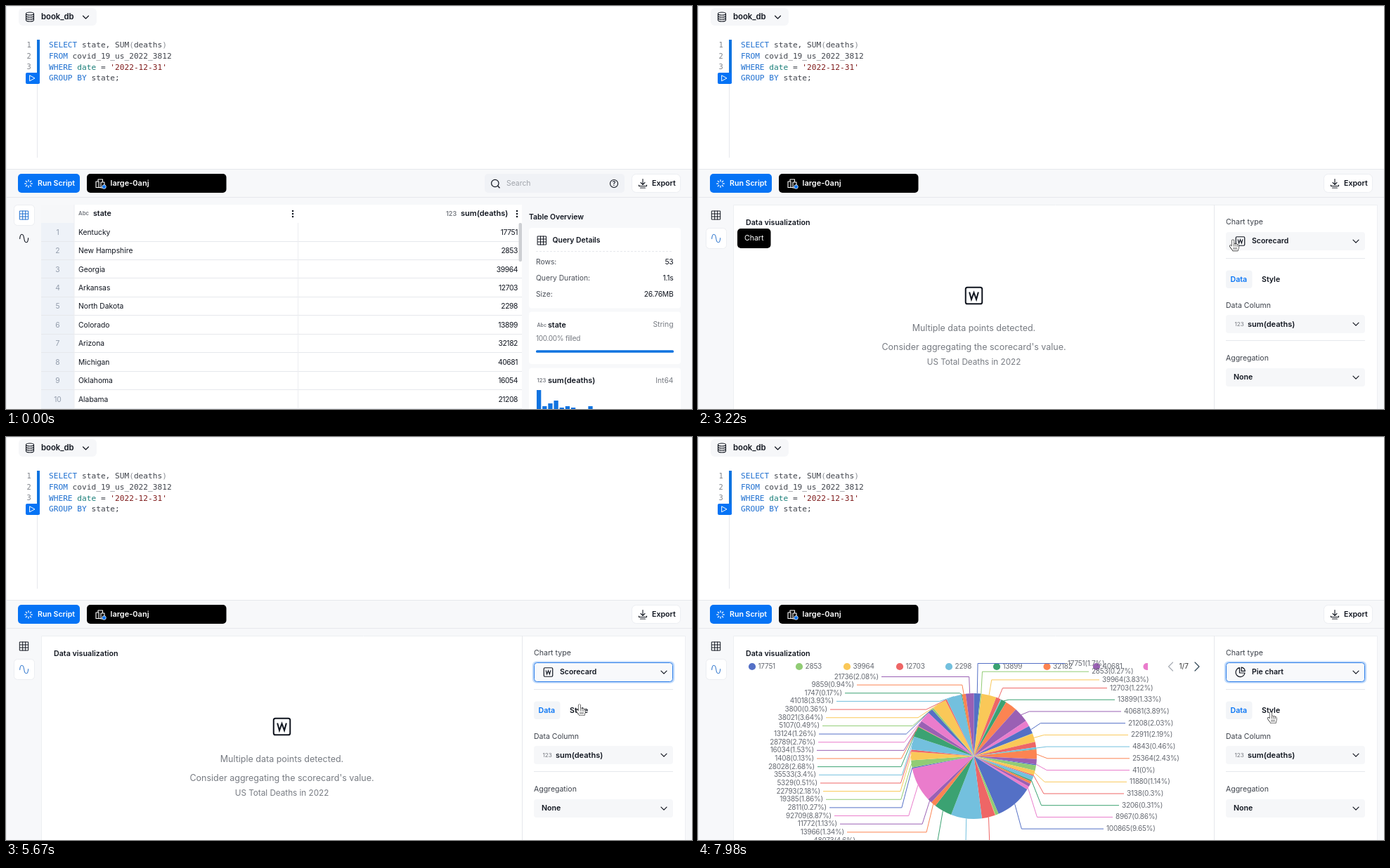
Animation of 976 by 574 pixels, one loop 8 s. Source, as an HTML page with a canvas:

```html
<!DOCTYPE html>
<html lang="en">
<head>
<meta charset="utf-8">
<title>Query chart</title>
<style>
html, body { margin: 0; width: 100%; height: 100%; overflow: hidden; background: #fff; }
canvas { display: block; width: 976px; height: 574px; }
</style>
</head>
<body>
<canvas id="stage"></canvas>
<script>
const W = 976, H = 574, LOOP = 8000, STEP = 70;
const INK = '#10151f', GRAY = '#777b82', BLUE = '#0573f5', LINE = '#e6e8ec', PALE = '#f6f7f9';
const PALETTE = ['#5470c6', '#91cc75', '#fac858', '#ee6666', '#73c0de', '#3ba272', '#fc8452', '#9a60b4', '#ea7ccc'];
const canvas = document.getElementById('stage');
const c = canvas.getContext('2d');
const dpr = window.devicePixelRatio || 1;
canvas.width = W * dpr;
canvas.height = H * dpr;

// helpers
const ramp = (t, a, b) => Math.min(1, Math.max(0, (t - a) / (b - a)));
const smooth = p => p * p * (3 - 2 * p);
const cubic = p => p < 0.5 ? 4 * p ** 3 : 1 - 4 * (1 - p) ** 3;

function text(s, x, y, size = 10.4, weight = 400, color = INK, align = 'left', spacing = 0) {
  c.font = `${weight} ${size}px Inter, Roboto, sans-serif`;
  c.letterSpacing = spacing + 'px';
  c.textAlign = align;
  c.fillStyle = color;
  c.fillText(s, x, y);
}
const bold = (s, x, y, size = 10.6, color = INK, align) => text(s, x, y, size, 600, color, align);

function box(x, y, w, h, r, fill, stroke, lw = 1) {
  c.beginPath();
  c.roundRect(x, y, w, h, r);
  if (fill) { c.fillStyle = fill; c.fill(); }
  if (stroke) { c.strokeStyle = stroke; c.lineWidth = lw; c.stroke(); }
}
function line(points, color = LINE, lw = 1) {
  c.beginPath();
  points.forEach(([x, y], i) => i ? c.lineTo(x, y) : c.moveTo(x, y));
  c.strokeStyle = color;
  c.lineWidth = lw;
  c.stroke();
}
function dot(x, y, r, fill, stroke, lw = 1.2) {
  c.beginPath();
  c.arc(x, y, r, 0, 7);
  if (fill) { c.fillStyle = fill; c.fill(); }
  if (stroke) { c.strokeStyle = stroke; c.lineWidth = lw; c.stroke(); }
}
function shape(d, x, y, stroke, lw = 1.2, fill) {
  c.save();
  c.translate(x, y);
  const p = new Path2D(d);
  c.lineJoin = c.lineCap = 'round';
  if (stroke) { c.strokeStyle = stroke; c.lineWidth = lw; c.stroke(p); }
  if (fill) { c.fillStyle = fill; c.fill(p); }
  c.restore();
}
function faded(alpha, draw) {
  if (alpha <= 0) return;
  c.save();
  c.globalAlpha = alpha;
  draw();
  c.restore();
}

// icons
const chevron = (x, y) => shape('M-4 -2L0 2L4 -2', x, y, INK, 1.15);
const gridIcon = (x, y, color) =>
  shape('M-6 -6H6V6H-6ZM-6 -2H6M-6 2H6M-2 -6V6M2 -6V6', x, y, color, 1);
const waveIcon = (x, y, color) =>
  shape('M-6 .5C-5.5 -8 -1 -7.5 0 0S5.5 8 6 -.5', x, y, color, 1.1);
const kebab = (x, y) => [-4, 0, 4].forEach(d => dot(x, y + d, 1.25, INK));

function wIcon(x, y, size, color, lw) {
  box(x - size / 2, y - size / 2, size, size, size / 9, null, color, lw);
  const k = size / 24;
  line([[-6.5, -5], [-3.6, 5.5], [0, -4.5], [3.6, 5.5], [6.5, -5]].map(([a, b]) => [x + a * k, y + b * k]), color, lw);
}
const typeIcons = [
  (x, y, col) => wIcon(x, y, 12.5, col, 1.2),
  (x, y, col) => shape('M-1 -6.3A6.5 6.5 0 1 0 6.5 1H-1ZM1.6 -6.8V-1.6H6.8A6 6 0 0 0 1.6 -6.8Z', x, y, col, 1.2),
  (x, y, col) => shape('M-6 2h3v4h-3ZM-1.6 -1h3v7h-3ZM3 -6h3v12h-3Z', x, y, col, 0.6, col),
  (x, y, col) => shape('M-6.5 -6.5V6.5H7M-5 4L-2 -1L1 1.5L6.5 -5.5', x, y, col, 1.2)
];
const TYPES = ['Scorecard', 'Pie chart', 'Bar chart', 'Line chart'];

// editor and toolbar
const CODE = [
  [['SELECT', '#1e6fd0'], [' state, ', '#40444c'], ['SUM', '#40444c'], ['(', '#8b8f96'], ['deaths', '#40444c'], [')', '#8b8f96']],
  [['FROM', '#1e6fd0'], [' covid_19_us_2022_3812', '#40444c']],
  [['WHERE', '#1e6fd0'], [' date', '#1b7f79'], [' = ', '#40444c'], ["'2022-12-31'", '#7f1a1a']],
  [['GROUP BY', '#1e6fd0'], [' state;', '#40444c']]
];
function editor() {
  c.fillStyle = '#fff';
  c.fillRect(0, 0, W, 232);
  box(18, 3, 111, 25, 6, PALE);
  shape('M-5.5 -4.5A5.5 2 0 0 1 5.5 -4.5A5.5 2 0 0 1 -5.5 -4.5V4.5A5.5 2 0 0 0 5.5 4.5V-4.5M-5.5 -1.5A5.5 2 0 0 0 5.5 -1.5M-5.5 1.5A5.5 2 0 0 0 5.5 1.5', 34, 15.5, INK, 1.1);
  bold('book_db', 50, 15.5, 11.3);
  chevron(113.5, 16);
  line([[44.5, 48], [44.5, 216]]);
  c.fillStyle = '#0f73e0';
  c.fillRect(44, 48, 4, 62);
  box(28, 95, 20, 16, 2, BLUE);
  shape('M-3 -3.8L4 0L-3 3.8Z', 37, 102.8, '#fff', 1);
  c.letterSpacing = '0px';
  CODE.forEach((parts, i) => {
    const y = 56.2 + i * 15.75;
    c.textAlign = 'left';
    c.font = '10.4px "DejaVu Sans Mono", monospace';
    c.fillStyle = '#80848b';
    if (i < 3) c.fillText(i + 1, 29.5, y);
    c.font = '11.16px "DejaVu Sans Mono", monospace';
    let x = 61;
    for (const [s, color] of parts) {
      c.fillStyle = color;
      c.fillText(s, x, y);
      x += c.measureText(s).width;
    }
  });
}
function toolbar(search) {
  line([[0, 232.5], [W, 232.5]]);
  line([[0, 272.5], [W, 272.5]]);
  box(17, 239, 88, 27, 5, BLUE);
  for (let i = 0; i < 8; i++) {
    const a = i * Math.PI / 4, s = Math.sin(a), k = Math.cos(a);
    line([[32 + s * 2.8, 253 + k * 2.8], [32 + s * 5.8, 253 + k * 5.8]], '#fff', 1.2);
  }
  bold('Run Script', 45, 253, 10.6, '#fff');
  box(115, 239, 198.5, 27, 5, '#000');
  shape('M-6 5.5V-3H-3V-6H3.5V-2M-6 5.5H1M-2 5V-3M1 -2H6V6H1Z', 134, 253, '#fff', 1.1);
  dot(139.5, 257.5, 2.8, BLUE, '#fff', 0.8);
  bold('large-0anj', 148.5, 253, 11, '#fff');
  if (search) {
    box(681, 239, 199, 27, 5, '#f0f2f6');
    dot(695.8, 252.5, 5.2, null, INK);
    line([[699.6, 256.3], [702.5, 259.2]], INK, 1.3);
    text('Search', 712, 253, 10.4, 400, '#a0a4ab');
    dot(865, 253, 5.5, null, INK, 1.1);
    bold('?', 865, 253.2, 8.5, INK, 'center');
  }
  box(890.5, 239.5, 69, 26, 6, '#fff', '#eceef2');
  shape('M0 -6V1.5M-3 -1.2L0 2L3 -1.2M-5.5 2.5V4H5.5V2.5M-3.5 6.5H3.5', 906, 252.5, INK, 1.1);
  bold('Export', 919, 253);
}
function sidebar(chart, hover) {
  box(11.5, chart ? 316.5 : 283.5, 29, 29, 5, '#fff', '#eceef2');
  if (!chart) faded(hover, () => box(11, 317, 30, 29, 5, '#eff1f5'));
  gridIcon(25.7, 298, chart ? INK : '#1e6fd0');
  waveIcon(25.7, 331, chart ? '#3d7fd0' : INK);
}

// table view
const ROWS = ['Kentucky', 'New Hampshire', 'Georgia', 'Arkansas', 'North Dakota', 'Colorado', 'Arizona', 'Michigan', 'Oklahoma', 'Alabama'];
const DEATHS = [
  17751, 2853, 39964, 12703, 2298, 13899, 32182, 40681, 16054, 21208, 1000, 22911, 14000, 4843, 1500, 25364, 14000, 41,
  3000, 14000, 11880, 3138, 12000, 3206, 7000, 8200, 8967, 100865, 9000, 800, 36000, 83000, 48073, 13966, 11772, 92709,
  2811, 19385, 22793, 5329, 35533, 28028, 1408, 16034, 28789, 13124, 5107, 38021, 3800, 41018, 1747, 9859, 21736
];
const TOTAL = 1044750;

function tableView() {
  c.fillStyle = '#fff';
  c.fillRect(50, 283, 684, 291);
  c.fillStyle = PALE;
  c.fillRect(50, 283, 47, 26);
  c.fillStyle = '#eef2f8';
  c.fillRect(50, 309, 47, 265);
  text('Abc', 103, 296, 7.8, 600, GRAY);
  bold('state', 124, 296, 10.7);
  kebab(408, 296);
  text('123', 626, 296, 9, 600, GRAY);
  bold('sum(deaths)', 647, 296, 11);
  kebab(727, 296);
  ROWS.forEach((name, i) => {
    const y = 322.5 + i * 26.45;
    line([[50, Math.round(y + 13) - 0.5], [734, Math.round(y + 13) - 0.5]]);
    text(i + 1, 73.5, y, 10.3, 400, '#929cab', 'center');
    text(name, 103, y, 10.3);
    text(DEATHS[i], 728, y, 10.3, 400, INK, 'right', -0.4);
  });
  line([[415.5, 309], [415.5, 574]], '#eceef1');
  line([[97, 283], [97, 574]], '#eceef1');
  box(729.5, 309, 4.5, 55, 2, '#cdcfd3');

  bold('Table Overview', 744, 301, 10.4);
  box(744, 316, 216, 114.5, 4, '#fff');
  gridIcon(762.5, 334, INK);
  bold('Query Details', 777.5, 334, 10.4);
  c.setLineDash([3, 2]);
  line([[754, 349.5], [949, 349.5]]);
  c.setLineDash([]);
  [['Rows:', '53'], ['Query Duration:', '1.1s'], ['Size:', '26.76MB']].forEach(([k, v], i) => {
    text(k, 754, 364.8 + i * 23.2, 10.3, 400, '#4a4f58');
    text(v, 949.5, 364.8 + i * 23.2, 10.3, 400, INK, 'right', -0.2);
  });
  box(744, 435.5, 216, 74.5, 4, '#fff');
  text('Abc', 755.5, 454.5, 7, 600, GRAY);
  bold('state', 771, 454.3, 10.7);
  text('String', 949.5, 454.3, 10.4, 400, GRAY, 'right');
  text('100.00% filled', 754, 474, 10, 400, GRAY, 'left', -0.3);
  box(754, 490.3, 196, 3.4, 1.5, '#0f73e0');
  box(744, 515.5, 216, 70, 4, '#fff');
  text('123', 755.5, 534, 7.6, 600, GRAY);
  bold('sum(deaths)', 771, 533.5, 11);
  text('Int64', 949.5, 533.5, 10.3, 400, GRAY, 'right');
  c.fillStyle = '#0f73e0';
  [27, 4, 8, 12, 2, 4, 2, 0, 0, 4].forEach((h, i) => c.fillRect(755 + i * 8.15, H - h, 6.3, h));
}

// pie
const RIGHT = [0, 1, 2, 3, 5, 7, 9, 11, 13, 15, 17, 20, 21, 23, 26, 27];
const RIGHT_X = [526, 560, 575, 586, 597, 606, 612, 616, 618, 618, 618, 614, 610, 603, 594, 581];
const LEFT_X = [257, 222, 205, 193, 184, 178, 173, 168, 167, 165, 165, 166, 168, 170, 174, 178, 183, 190, 198, 208, 224];
const CX = 392.5, CY = 454.5, R = 89.5;
const SUM = DEATHS.reduce((a, b) => a + b);
let turn = 0;
const SLICES = DEATHS.map((v, i) => {
  const from = turn;
  turn += v / SUM * Math.PI * 2;
  return { v, from, to: turn, mid: (from + turn) / 2, color: PALETTE[i % 9] };
});
const polar = (a, r) => [CX + Math.sin(a) * r, CY - Math.cos(a) * r];

// Draws the first part p of a polyline.
function partLine(pts, p, color) {
  const lens = pts.slice(1).map(([x, y], i) => Math.hypot(x - pts[i][0], y - pts[i][1]));
  let left = p * lens.reduce((a, b) => a + b);
  const out = [pts[0]];
  lens.forEach((len, i) => {
    if (left <= 0) return;
    const k = Math.min(1, left / len), [x, y] = pts[i];
    out.push([x + (pts[i + 1][0] - x) * k, y + (pts[i + 1][1] - y) * k]);
    left -= len;
  });
  line(out, color);
}
function callout(i, x, y, side, p) {
  const s = SLICES[i], end = x - side * 4;
  const [x0, y0] = polar(s.mid, R);
  const nx = Math.sin(s.mid), ny = -Math.cos(s.mid);
  let bend = x0 + nx * 15;
  // A leader never cuts into the pie: it leaves along the tangent at most.
  if ((bend - x0) * nx + (y - y0) * ny < 0) bend = x0 - (y - y0) * ny / nx;
  if ((end - bend) * side < 0) bend = end;
  partLine([[x0, y0], [bend, y], [end, y]], p, s.color);
  const label = `${s.v}(${+(s.v / TOTAL * 100).toFixed(2)}%)`;
  faded(p, () => text(label, x, y, 10, 400, '#666a72', side > 0 ? 'left' : 'right', -0.25));
}
function pie(p) {
  c.save();
  c.beginPath();
  c.rect(51, 283, 589, 291);
  c.clip();
  [77, 144, 212, 287, 357, 425, 496.5, 567, 638.5].forEach((x, i) => {
    dot(x, 327, 5.1, PALETTE[i]);
    text(DEATHS[i], x + 8.5, 327, 10, 400, '#666a72', 'left', -0.2);
  });
  c.restore();
  shape('M3 -6L-3 0L3 6', 672.5, 327, '#a9adb5', 1.2);
  text('1/7', 684.5, 327, 10, 400, '#333');
  shape('M-3 -6L3 0L-3 6', 710, 327, '#2f4554', 1.2);

  for (const s of SLICES) {
    c.beginPath();
    c.moveTo(CX, CY);
    c.arc(CX, CY, R, s.from * p - Math.PI / 2, s.to * p - Math.PI / 2);
    c.closePath();
    c.fillStyle = s.color;
    c.fill();
  }
  if (p < 0.01) line([[CX + 0.5, 365], [CX + 0.5, 446]], '#9a9a9a', 0.8);
  RIGHT.forEach((n, i) => callout(n, RIGHT_X[i], i < 4 ? 322.5 + 11.7 * i : 357.5 + 16.72 * (i - 3), 1, p));
  LEFT_X.forEach((x, i) => callout(52 - i, x, 341.5 + 11.65 * i, -1, p));
  [30, 31].forEach(n => {
    const s = SLICES[n];
    partLine([polar(s.mid, R), [polar(s.mid, R + 6)[0], 580]], p, s.color);
  });
}

// chart view
function select(y, ring) {
  if (ring) {
    box(750, y - 1.5, 200, 29, 5, null, '#c3dcfb', 2.5);
    box(751.5, y - 0.5, 197, 27, 4, '#f8f9fb', '#2b7de9', 1);
  } else box(751, y, 198, 26, 4, PALE);
  chevron(936, y + 13.2);
}
function chartView(s) {
  c.fillStyle = '#fff';
  c.fillRect(51, 283, 915, 291);
  line([[50.5, 574], [50.5, 283.5], [966.5, 283.5], [966.5, 574]], '#edeff2');
  line([[734.5, 283], [734.5, 574]]);
  bold('Data visualization', 68, 308.5, 10.7);
  if (s.type) pie(s.pie);
  else {
    wIcon(392.5, 412.5, 23.5, INK, 2);
    text('Multiple data points detected.', 392.5, 459.5, 12.5, 400, GRAY, 'center');
    text("Consider aggregating the scorecard's value.", 392.5, 486, 12.5, 400, GRAY, 'center');
    text('US Total Deaths in 2022', 392.5, 507.5, 11.7, 400, GRAY, 'center');
  }
  text('Chart type', 751, 308, 10.6, 400, '#3c414a');
  select(322, s.ring);
  typeIcons[s.type](771.5, 335, INK);
  if (s.menu > 0.5) text(TYPES[s.type], 788, 335, 10.5, 400, '#9a9da3');
  else bold(TYPES[s.type], 788, 335, 10.5);
  line([[751, 359.5], [949, 359.5]]);
  box(751, 376.5, 37.5, 25.5, 4, '#f3f5f8');
  bold('Data', 757.5, 389.5, 10.6, BLUE);
  bold('Style', 802, 389.5);
  text('Data Column', 751, 426.5, 10.5, 400, '#3c414a');
  select(440, false);
  text('123', 763.5, 453.8, 8.2, 400, GRAY);
  bold('sum(deaths)', 782, 453.5, 11);
  line([[751, 476.5], [949, 476.5]]);
  text('Aggregation', 751, 501.5, 10.5, 400, '#3c414a');
  select(516, false);
  bold('None', 762, 529, 10.6);
  faded(s.menu, () => menu(s));
}
function menu(s) {
  c.save();
  c.shadowColor = 'rgba(20,30,50,.25)';
  c.shadowBlur = 5 * dpr;
  c.shadowOffsetY = dpr;
  box(751, 351, 197.5, 113, 4, '#fff');
  c.restore();
  TYPES.forEach((name, i) => {
    const y = 368.2 + i * 26.4, on = i === s.type;
    if (on) box(754, y - 13.2, 191.5, 26.4, 2, i ? '#0562d2' : BLUE);
    else if (i === s.hover) box(754, y - 13.2, 191.5, 26.4, 2, '#eef3fa');
    typeIcons[i](771, y, on ? '#fff' : INK);
    text(name, 787.5, y, 10.5, on ? 600 : 400, on ? '#fff' : INK);
  });
}

// pointer
const TRACK = [
  [1960, 27, 331], [2660, 27, 331], [2940, 756, 333], [3150, 756, 333], [3430, 789, 334], [4270, 789, 334],
  [4340, 797, 335], [4550, 817, 338], [5180, 817, 338], [5670, 816, 381], [5810, 809, 380],
  [5950, 829, 350], [6020, 830, 350], [6160, 833, 334], [6720, 833, 334], [7350, 815, 392], [8000, 815, 392]
];
const CLICKS = [[2170, 2240], [3570, 3780], [4620, 4690], [7560, 7700]];
const HAND = 'M-1.5 1.3C-1.5 -.4 1.3 -.4 1.3 1.3V6C1.6 5 3.6 5 3.8 6.3C4.4 5.5 6 5.8 6.1 7C6.8 6.6 7.9 7 7.9 8.2V11C7.9 12.6 7 13 6.8 15.4H-.2C-.6 13.6 -2.6 12.4 -4.4 9.2C-5 8 -3.4 7.2 -2.6 8.2L-1.5 9.6Z';
const ARROW = 'M0 0V13L3 10.3L5 15L7 14.2L5 9.7H9Z';

function pointer(t) {
  if (t < TRACK[0][0]) return;
  const n = TRACK.findIndex((k, i) => i && t < k[0]);
  const [t0, x0, y0] = TRACK[n - 1], [t1, x1, y1] = TRACK[n];
  const p = smooth(ramp(t, t0, t1));
  const x = x0 + (x1 - x0) * p, y = y0 + (y1 - y0) * p;
  if (CLICKS.some(([a, b]) => t >= a && t < b)) dot(x, y + 1, 25.5, 'rgba(90,100,115,.12)');
  if (x > 45 && x < 750) shape(ARROW, x, y, '#fff', 2, '#000');
  else {
    shape(HAND, x, y, '#111', 1.2, '#fff');
    shape('M1.3 6V9M3.8 6.5V9M6.1 7.2V9.3M1 11V13.4M3 11V13.4M5 11V13.4', x, y, '#222', 0.7);
  }
}
function tooltip() {
  box(56, 317, 47.5, 28, 5, '#000');
  text('Chart', 79.7, 331, 10.6, 400, '#fff', 'center');
}

function draw(t) {
  const chart = t >= 2380;
  c.setTransform(dpr, 0, 0, dpr, 0, 0);
  c.textBaseline = 'middle';
  c.fillStyle = '#f7f8fa';
  c.fillRect(0, 0, W, H);
  editor();
  toolbar(!chart);
  if (chart) {
    chartView({
      type: t >= 7700 ? 1 : 0,
      pie: cubic(ramp(t, 7695, 7970)),
      ring: t >= 5040,
      hover: t >= 7070 ? 1 : 0,
      menu: ramp(t, 4970, 5180) - ramp(t, 5400, 5600) + ramp(t, 6230, 6440) - ramp(t, 7720, 7910)
    });
  } else tableView();
  sidebar(chart, ramp(t, 770, 1120));
  faded(ramp(t, 1400, 1540) - ramp(t, 5110, 5320), tooltip);
  line([[0, 0.5], [W, 0.5]], '#eceef1');
  line([[0.5, 0], [0.5, H]], LINE);
  pointer(t);
}

const start = performance.now();
function tick() {
  const t = (performance.now() - start) % LOOP;
  draw(Math.floor(t / STEP) * STEP);
  requestAnimationFrame(tick);
}
tick();
</script>
</body>
</html>
```
